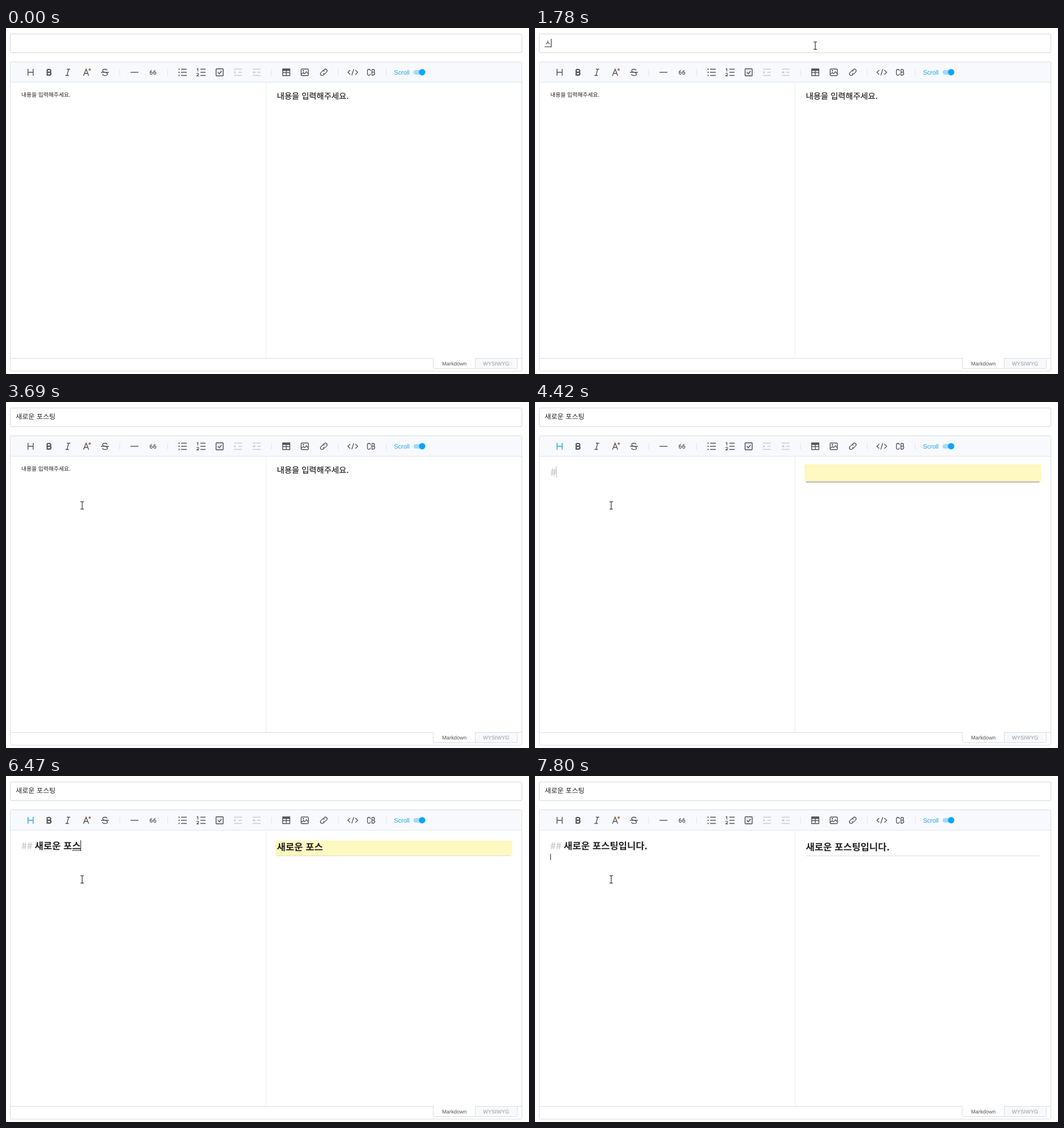
These frames come from a looping animation (920x609 px, 8 s). An HTML page:

```html
<!DOCTYPE html>
<html lang="ko">
<head>
<meta charset="utf-8">
<style>
  html, body { margin: 0; width: 100%; height: 100%; overflow: hidden; background: #fff; }
  svg { display: block; width: 920px; height: 609px; }
  text { font-family: "Noto Sans CJK KR", "Noto Sans CJK JP", "Noto Sans CJK", sans-serif; fill: #222; white-space: pre; text-rendering: geometricPrecision; }
  .ui { font-family: "Liberation Sans", Arial, sans-serif; }
  .icon { fill: none; stroke: #555; stroke-width: 1.4; }
  .icon text { stroke: none; fill: #555; font-family: Roboto, sans-serif; }
  .off { stroke: #ccc; }
  .solid { fill: #555; stroke: none; }
  .frame { fill: #fff; stroke: #dadde3; }
  .heading { font-size: 16.6px; font-weight: 700; }
</style>
</head>
<body>
<svg viewBox="0 0 920 609">
  <rect class="frame" x="7.5" y="10.5" width="900" height="33" rx="2.5" style="stroke:#d6d6d6"/>
  <rect class="frame" x="7.5" y="59.5" width="900" height="544.5" rx="2.5"/>
  <path d="M8 95V62q0-2 2-2H905q2 0 2 2V95z" fill="#f7f9fc"/>
  <path d="M8 95.5H907M8 581.5H907" stroke="#e2e5ea"/>
  <path d="M457.5 96V581" stroke="#ebedf2"/>
  <path d="M8 581.5H907" stroke="#dadde3"/>
  <path d="M751.5 581V597q0 2.5 2.5 2.5H825.5V581" class="frame"/>
  <path d="M752 581.5H825" stroke="#fff" stroke-width="2"/>
  <path d="M825.5 581.5H899.5V597q0 2.5-2.5 2.5H825.5z" class="frame" style="fill:#f7f9fc"/>
  <text class="ui" x="767" y="594" font-size="9.4" style="fill:#555">Markdown</text>
  <text class="ui" x="839" y="594" font-size="9.4" style="fill:#999">WYSIWYG</text>

  <path d="M200 72.500V84M284.500 72.500V84M467 72.500V84M584.500 72.500V84M669 72.500V84" stroke="#e0e3e9"/>
  <g class="icon">
    <path id="headingIcon" d="M38.7 72V84M47.800 72V84M38.7 78H47.8"/>
    <path d="M72.500 73H76.300a2.300 2.300 0 0 1 0 4.800H72.500M76.500 77.800a2.500 2.500 0 0 1 0 5H72.500V73" stroke-width="2.2"/>
    <path d="M107 72.500H113M104.500 83.500H110.500M110.200 72.500L107.300 83.500"/>
    <path d="M136.300 84L140.900 72.500L145.500 84M138 80H144"/>
    <circle cx="147.200" cy="73.200" r="1.9" fill="#c8622a" stroke="none"/>
    <path d="M178 74.500C177 71.800 170 71.600 170 75.200C170 77 172 77.500 174 78C177 78.600 178.500 79.300 178.500 81C178.500 84.600 170.500 84.400 169.500 81.300M167 78H181" stroke-width="1.3"/>
    <path d="M219 78H233"/>
    <text x="252.200" y="82" font-size="11" font-weight="500">66</text>
    <path d="M308 72.500H318M308 78H318M308 83.500H318"/>
    <path class="solid" d="M303.500 71.500h2v2h-2zM303.500 77h2v2h-2zM303.500 82.500h2v2h-2z"/>
    <path d="M342 72.500H351M342 78H351M342 83.500H351"/>
    <path d="M335.500 72.300L337.500 71.500V76.500M335.500 81C335.500 79 339 79 339 81C339 82 337 83 335.700 84.300H339.300" stroke-width="1.2"/>
    <rect x="369.500" y="71.700" width="12.600" height="12.600" rx="1" fill="#e6e8f2"/>
    <path d="M372.700 78L375.200 80.500L379.300 75.700"/>
    <g class="off">
      <path d="M401 72.500H415M408.500 78H415M401 83.500H415"/>
      <path d="M401.500 75.500L405 78L401.500 80.500z" fill="#ccc" stroke="none"/>
      <path d="M434 72.500H448M441.500 78H448M434 83.500H448M434 78H439"/>
      <path d="M437.500 75.500L434 78L437.500 80.500z" fill="#ccc" stroke="none"/>
    </g>
    <path d="M486.700 72.200H499.300V83.800H486.700zM486.700 78.500H499.300M493 75V84"/>
    <path class="solid" d="M486 71.500h14v4h-14z"/>
    <rect x="519.200" y="72.200" width="12.600" height="11.600" rx="1"/>
    <path d="M519.500 81.500L523 78.200L525.500 80.500L528.500 77L531.500 80.500" stroke-width="1.2"/>
    <circle class="solid" cx="523" cy="75.300" r="1.200"/>
    <g transform="rotate(-45 559 78)" stroke-width="1.3">
      <path d="M558 80.700H555a2.900 2.900 0 0 1 0-5.800H558.500q2.500 0 2.800 2.600"/>
      <path d="M560 75.300H563a2.900 2.900 0 0 1 0 5.800H559.500q-2.500 0-2.800-2.600"/>
    </g>
    <path d="M605.500 74L601.300 78L605.500 82M614.500 74L618.700 78L614.500 82M611.800 72.500L608.200 83.500" stroke-width="1.3"/>
    <path d="M641 75.500C640.400 71.600 635.700 71.900 635.700 76V80C635.700 84.200 640.400 84.400 641 80.500M643.700 73H646a2.300 2.300 0 0 1 0 4.700H643.700M646 77.700a2.600 2.600 0 0 1 0 5.300H643.700V73" stroke-width="1.3"/>
  </g>
  <text class="ui" x="682.500" y="81.500" font-size="11" style="fill:#1fa4ee">Scroll</text>
  <rect x="717" y="74" width="17" height="8" rx="4" fill="#a3d9fb"/>
  <circle cx="732" cy="77.800" r="5.600" fill="#0aa5ff"/>

  <text id="title" x="17" y="30" font-size="12.1"></text>
  <text id="hint" x="27" y="121" font-size="9.8">내용을 입력해주세요.</text>
  <text id="hintPreview" x="476.500" y="125.400" font-size="14.3" font-weight="500" stroke="#222" stroke-width=".2">내용을 입력해주세요.</text>
  <rect id="glow" x="474" width="416.500" rx="3.500" fill="#fef8c1"/>
  <path id="rule"/>
  <text id="marks" class="heading" x="27" y="128.500" style="fill:#ccc"></text>
  <text id="body" class="heading" x="50.500" y="128.500"></text>
  <text id="preview" class="heading" x="476.500" y="131"></text>
  <path id="underline" stroke="#222"/>
  <path id="caret"/>
  <path id="beam" d="M-3 -6.500H-1Q0 -6.500 0 -5.500Q0 -6.500 1 -6.500H3M0 -5.500V5.500M-3 6.500H-1Q0 6.500 0 5.500Q0 6.500 1 6.500H3" fill="none" stroke="#222" stroke-width="1.1"/>
  <path id="arrow" d="M0 0V12L2.800 9.500L4.600 13.500L6.300 12.700L4.600 9H8z" fill="#fff" stroke="#222" stroke-width=".8"/>
</svg>
<script>
const LOOP = 8000;
const el = Object.fromEntries([...document.querySelectorAll("[id]")].map(e => [e.id, e]));

// [time, text]; the last syllable is still being composed while typing
const titleKeys = [
  [0, ""], [1120, "ㅅ"], [1510, "세"], [1660, ""], [1780, "ㅅ"], [1910, "새"], [1980, "샐"],
  [2050, "새로"], [2120, "새롱"], [2190, "새로우"], [2260, "새로운"], [2340, "새로운 ㅍ"],
  [2430, "새로운 포"], [2560, "새로운 폿"], [2650, "새로운 포스"], [2760, "새로운 포슽"],
  [2820, "새로운 포스티"], [2900, "새로운 포스팅"]
];
const bodyKeys = [
  [0, ""], [5480, "ㅅ"], [5570, "새"], [5670, "새로"], [5810, "새롱"], [5890, "새로우"],
  [6030, "새로운"], [6120, "새로운 "], [6210, "새로운 ㅍ"], [6300, "새로운 포"], [6390, "새로운 폿"],
  [6470, "새로운 포스"], [6540, "새로운 포슽"], [6620, "새로운 포스티"], [6700, "새로운 포스팅"],
  [6800, "새로운 포스팅ㅇ"], [6870, "새로운 포스팅이"], [7000, "새로운 포스팅입"],
  [7200, "새로운 포스팅입니"], [7300, "새로운 포스팅입니다"], [7400, "새로운 포스팅입니다."]
];
const markKeys = [[0, ""], [4420, "#"], [4550, "##"]];
const moves = [
  { start: 390, end: 790, points: [[764, 116], [722, 102], [650, 82], [580, 58], [528, 40], [501, 33], [493, 31]] },
  { start: 3220, end: 3690, points: [[488, 40], [440, 74], [352, 118], [252, 160], [176, 187], [140, 194], [135, 188], [134, 182]] }
];

const valueAt = (keys, t) => keys.findLast(k => k[0] <= t)[1];
const show = (node, on) => node.setAttribute("visibility", on ? "visible" : "hidden");
const setText = (node, s) => { if (node.textContent !== s) node.textContent = s; };
const endOf = node => +node.getAttribute("x") + (node.textContent ? node.getComputedTextLength() : 0);

function drawCaret(x, top, bottom, color = "#222") {
  el.caret.setAttribute("d", `M${Math.floor(x) + .5} ${top}V${bottom}`);
  el.caret.setAttribute("stroke", color);
  show(el.caret, true);
}

function drawUnderline(node, y) {
  const s = node.textContent;
  if (!s || /[ .]$/.test(s)) return;
  const end = endOf(node);
  const width = node.getSubStringLength(s.length - 1, 1);
  el.underline.setAttribute("d", `M${end - width} ${y}H${end}`);
  show(el.underline, true);
}

function drawPointer(t) {
  const move = moves.findLast(m => m.start <= t);
  show(el.beam, false);
  show(el.arrow, false);
  if (!move) return;
  const last = move.points.length - 1;
  const step = Math.floor((t - move.start) / (move.end - move.start) * last + 1e-6);
  const [x, y] = move.points[Math.min(last, step)];
  const node = y > 59 && y < 96 ? el.arrow : el.beam;
  node.setAttribute("transform", `translate(${x} ${y})`);
  show(node, true);
}

function drawPreviewBlock(t) {
  const level = t < 4420 ? 0 : t < 4550 ? 1 : 2;
  const top = level === 1 ? 109.5 : 113.5;
  el.glow.setAttribute("y", top);
  el.glow.setAttribute("height", (level === 1 ? 140.5 : 141) - top);
  show(el.glow, level && t < 7800);
  el.rule.setAttribute("d", level === 1 ? "M476.500 140.800H887.500" : "M476.500 140.500H887.500");
  el.rule.setAttribute("stroke", level === 1 ? "#c2c2c2" : "#dcdcdc");
  el.rule.setAttribute("stroke-width", level === 1 ? 2.6 : 1);
  show(el.rule, level);
}

function render(t) {
  const bodyText = valueAt(bodyKeys, t);
  setText(el.title, valueAt(titleKeys, t));
  setText(el.marks, valueAt(markKeys, t));
  setText(el.body, bodyText);
  setText(el.preview, bodyText);
  const single = t >= 4420 && t < 4550;
  el.marks.style.fontSize = single ? "18.1px" : "";
  el.marks.setAttribute("y", single ? 129.5 : 128.5);
  show(el.hint, t < 4020);
  show(el.hintPreview, t < 4420);
  el.headingIcon.style.stroke = t >= 4420 && t < 7800 ? "#2ba3e3" : "";

  show(el.caret, false);
  show(el.underline, false);
  if (t >= 790 && t < 3690) {
    drawCaret(endOf(el.title), 19, 34);
    drawUnderline(el.title, 33);
  } else if (t >= 7800) {
    drawCaret(27, 137, 148);
  } else if (t >= 5480) {
    drawCaret(endOf(el.body), 113, 132);
    drawUnderline(el.body, 131);
  } else if (t >= 5340) {
    drawCaret(50, 113, 132, "#bbb");
  } else if (t >= 4420 && t < 5080) {
    drawCaret(endOf(el.marks), 113, single ? 133 : 132, "#bbb");
  } else if (t >= 4020 && t < 4420) {
    drawCaret(27, 111, 123);
  }
  drawPreviewBlock(t);
  drawPointer(t);
}

const began = performance.now();
function tick() {
  render((performance.now() - began) % LOOP);
  requestAnimationFrame(tick);
}
tick();
</script>
</body>
</html>
```
